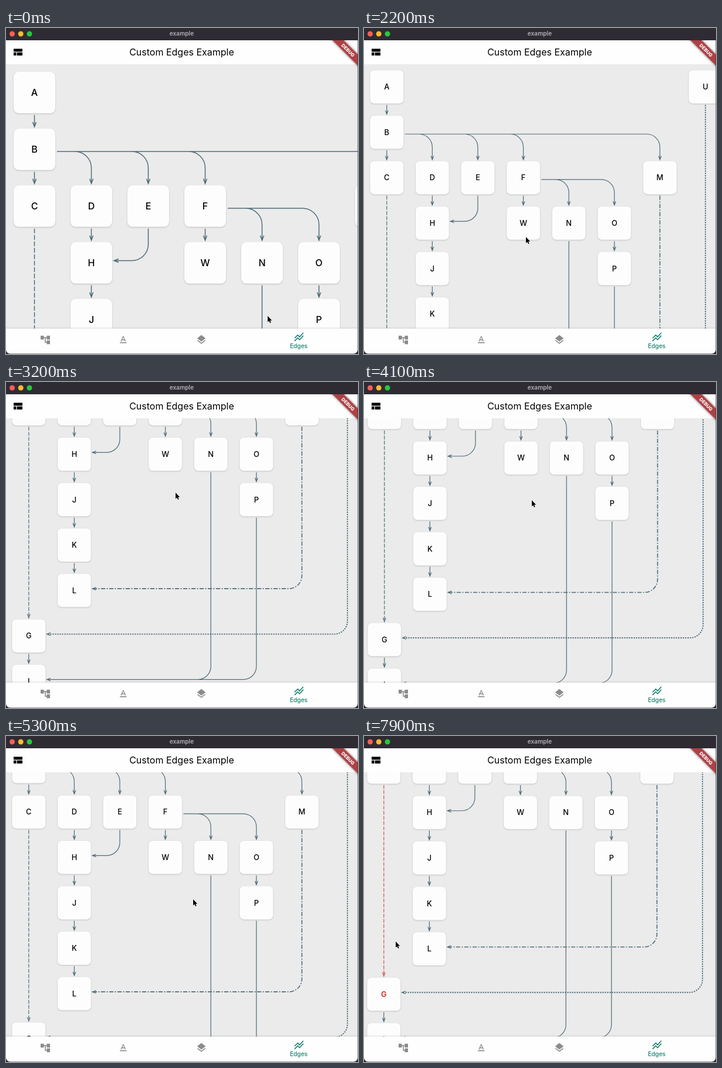
Recreate the animation shown at these times as an HTML page. Size 600 by 557 pixels, loop 8000 ms.

```html
<!DOCTYPE html>
<html>
<head>
<meta charset="utf-8">
<style>
html, body { margin: 0; width: 100%; height: 100%; overflow: hidden; background: #ebebeb; }
svg { display: block; font-family: Inter, Roboto, sans-serif; text-anchor: middle; }
#edges path { fill: none; stroke: #4f6c79; stroke-width: 1.5; }
#edges .dashed { stroke-dasharray: 8 3; }
#edges .mixed { stroke-dasharray: 9 3 2.5 3; stroke-width: 2; }
#edges .dotted { stroke-dasharray: 2.5 2.5; stroke-width: 2.6; }
#nodes rect { fill: #fdfdfe; filter: drop-shadow(0 1px 1px #0003); }
#nodes text { font-size: 16px; font-weight: 500; }
#edges .hot { stroke: #d2544a; }
#nodes .hot { fill: #d93a2f; font-weight: 700; }
</style>
</head>
<body>
<svg width="600" height="557" viewBox="0 0 600 557">
  <rect y="61" width="600" height="453" fill="#ebebeb"/>
  <g id="world"><g id="edges"></g><g id="nodes"></g></g>

  <rect y="20" width="600" height="42" fill="#fefefe"/>
  <path d="M13 35.5h15v5h-15zM13 41.7h4.5v5.3h-4.5zM18.7 41.7h9.3v5.3h-9.3z"/>
  <text x="299.5" y="47" font-size="16">Custom Edges Example</text>
  <g transform="translate(583 38) rotate(45)">
    <rect x="-45" y="-6.7" width="90" height="13.4" fill="#ad4145" style="filter:drop-shadow(0 0 2px #0008)"/>
    <text y="2.9" font-size="8" font-weight="800" fill="#fff">DEBUG</text>
  </g>

  <rect width="600" height="21" fill="#2f2b33"/>
  <circle cx="10.5" cy="10" r="4.5" fill="#ff5f57"/>
  <circle cx="25.2" cy="10" r="4.5" fill="#febc2e"/>
  <circle cx="40" cy="10" r="4.5" fill="#28c840"/>
  <text x="299.5" y="13.4" font-size="10.1" font-weight="600" fill="#b4b1b6">example</text>

  <rect y="513.5" width="600" height="44" fill="#fefefe" style="filter:drop-shadow(0 -1px 1px #0002)"/>
  <g fill="#8b8b8b">
    <path transform="translate(57.4 523.4) scale(.8)" d="M22 11V3h-7v3H9V3H2v8h7V8h2v10h4v3h7v-8h-7v3h-2V8h2v3z"/>
    <path transform="translate(190.2 523.2) scale(.8)" d="M5 17v2h14v-2H5zm4.5-4.2h5l.9 2.2h2.1L12.75 4h-1.5L6.5 15h2.1l.9-2.2zM12 5.98L13.87 11h-3.74L12 5.98z"/>
    <path transform="translate(323.4 523) scale(.8)" d="M12 18.54l-7.4-5.73L3 14.07l9 7 9-7-1.63-1.27zM12 16l9-7-9-7-9 7z"/>
  </g>
  <g fill="#168070">
    <path transform="translate(489.7 518.2) scale(.8)" d="M2 19.99l7.5-7.51 4 4 7.09-7.97L22 9.92l-8.5 9.56-4-4-6 6.01zm1.5-4.5l6-6.01 4 4L22 3.92l-1.41-1.41-7.09 7.97-4-4L2 13.99z"/>
    <text x="499" y="547.3" font-size="10.2" font-weight="500">Edges</text>
  </g>
  <path fill="#2b2830" fill-rule="evenodd" d="M0 21H600V557H0zM0 21V549.5a7 7 0 0 0 7 7H592.5a7 7 0 0 0 7-7V21z"/>
  <path id="cursor" d="M0 0V10.6l2.4-2.2 1.6 3.6 1.7-.8-1.6-3.4h3.2z" stroke="#fff" stroke-width=".9" paint-order="stroke"/>
</svg>
<script>
const $ = id => document.getElementById(id);
const CELL = 97, HALF = 35.5, GAP = HALF + 3, R = 28, LANE = 3.8;
const grid = ['A......U', 'B', 'CDEF..M', '.H.WNO', '.J...P', '.K', '.L', 'G', 'I'];
const links = 'AB BC BD BE BF BM DH EH FW FN FO HJ OP JK KL CG ML UG GI NI PI'.split(' ');
const styles = { CG: 'dashed', ML: 'mixed', UG: 'dotted' };

function add(parent, tag, attrs, text = '') {
  const el = document.createElementNS('http://www.w3.org/2000/svg', tag);
  for (const k in attrs) el.setAttribute(k, attrs[k]);
  el.textContent = text;
  return parent.appendChild(el);
}

const centers = {}, hot = [];
grid.forEach((row, j) => [...row].forEach((name, i) => {
  if (name === '.') return;
  const x = (i + .5) * CELL, y = (j + .5) * CELL;
  centers[name] = [x, y];
  add($('nodes'), 'rect', { x: x - HALF, y: y - HALF, width: 2 * HALF, height: 2 * HALF, rx: 9 });
  const label = add($('nodes'), 'text', { x, y: y + 5.8 }, name);
  if (name === 'G') hot.push(label);
}));

// Line and arrowhead of the edge between two nodes
function route([x1, y1], [x2, y2]) {
  if (x1 > x2) return [
    `M${x1} ${y1 + GAP}V${y2 - LANE - R}a${R} ${R} 0 0 1 ${-R} ${R}H${x2 + GAP}`,
    `M${x2 + GAP + 8} ${y2 - LANE - 3}l-8 3l8 3`
  ];
  const start = x1 < x2
    ? `M${x1 + GAP} ${y1 + LANE}H${x2 - R}a${R} ${R} 0 0 1 ${R} ${R}`
    : `M${x1} ${y1 + GAP}`;
  return [`${start}V${y2 - GAP}`, `M${x2 - 3} ${y2 - GAP - 8}l3 8l3 -8`];
}

let solid = ''; // one path, so that shared stretches are stroked once
for (const link of links) {
  const [line, head] = route(centers[link[0]], centers[link[1]]);
  if (!styles[link]) { solid += line + head; continue; }
  const parts = [
    add($('edges'), 'path', { d: line, class: styles[link] }),
    add($('edges'), 'path', { d: head })
  ];
  if (link === 'CG') hot.push(...parts);
}
add($('edges'), 'path', { d: solid });

const ramp = (t, a, b) => Math.min(1, Math.max(0, (t - a) / (b - a)));
const ease = (t, a, b) => { const p = ramp(t, a, b); return p * p * (3 - 2 * p); };
const bump = (t, a, b) => Math.sin(Math.PI * ramp(t, a, b)) ** 2;

// Cursor stops: time, x, y
const stops = [
  [0, 446, 492], [600, 290, 340], [1600, 290, 340], [2200, 276, 357], [3200, 289, 189], [4100, 286, 202],
  [5300, 319, 279], [6100, 314, 202], [6600, 79, 228], [7300, 45, 330], [7900, 54, 351]
];

function cursorAt(t) {
  let [, x, y] = stops[0];
  for (let i = 1; i < stops.length; i++) {
    const [t0, x0, y0] = stops[i - 1], [t1, x1, y1] = stops[i];
    const e = ease(t, t0, t1);
    x += (x1 - x0) * e;
    y += (y1 - y0) * e;
  }
  return [x, y];
}

function draw(now) {
  const t = Math.floor(now % 8000 / 100) * 100;
  const zoom = 1 - .2 * ease(t, 700, 1600);
  const panX = -3 * bump(t, 2200, 2800) - 8 * bump(t, 3500, 4300) - 5 * ease(t, 7400, 7900);
  const panY = -210 * ease(t, 2200, 3200) + 6.4 * ease(t, 3200, 4100)
    + 77.6 * (ease(t, 4100, 5300) - ease(t, 5300, 6100)) + ease(t, 7400, 7900);
  $('world').setAttribute('transform', `translate(${panX} ${61.8 + panY}) scale(${zoom})`);
  $('cursor').setAttribute('transform', `translate(${cursorAt(t)})`);
  hot.forEach(el => el.classList.toggle('hot', t >= 7300));
  requestAnimationFrame(draw);
}
draw(performance.now());
</script>
</body>
</html>
```
